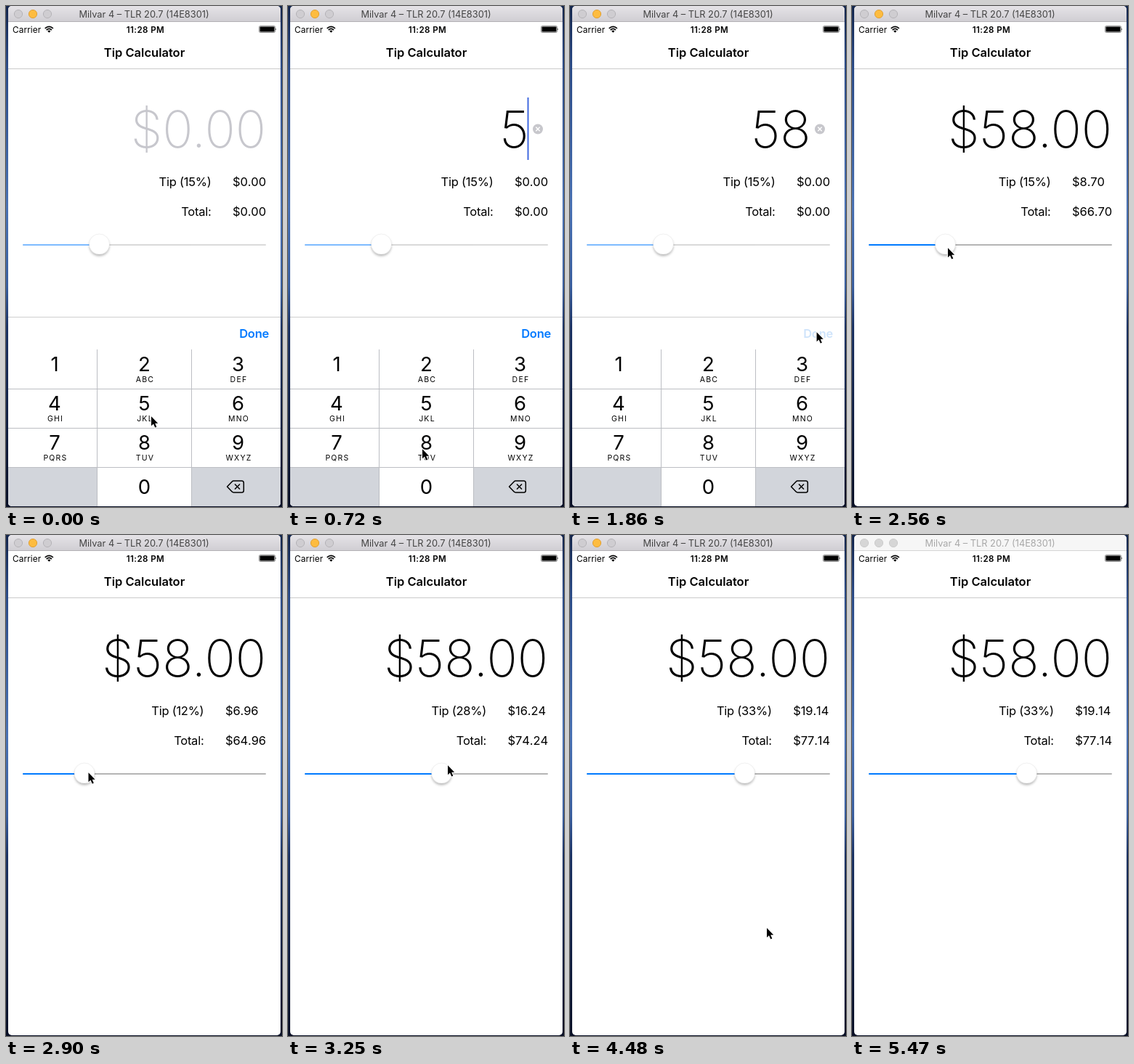
Recreate the animation shown at these times as an HTML page. Size 380 by 690 pixels, loop 5540 ms.

```html
<!DOCTYPE html>
<html lang="en">
<head>
<meta charset="utf-8">
<title>Tip Calculator</title>
<style>
html, body { margin: 0; width: 100%; height: 100%; overflow: hidden; background: #0a1026; }
svg { display: block; }
text { font: 16.5px Inter, "Liberation Sans", sans-serif; letter-spacing: -.25px; font-optical-sizing: none; }
.mid { text-anchor: middle; }
.end { text-anchor: end; }
.semi { font-weight: 600; }
.value { font-kerning: none; letter-spacing: -.1px; }
#amount { font-size: 70px; font-weight: 200; letter-spacing: 0; }
#heading { letter-spacing: 0; }
.digit { font-size: 27.5px; letter-spacing: 0; }
.letters { font-size: 10.5px; letter-spacing: 1.25px; }
</style>
</head>
<body>
<svg width="380" height="690" viewBox="0 0 380 690">
  <defs>
    <linearGradient id="desk" x2="0" y2="1">
      <stop stop-color="#14264c"/><stop offset=".12" stop-color="#2c4c88"/>
      <stop offset=".4" stop-color="#4a72b4"/><stop offset=".56" stop-color="#3a5f9f"/>
      <stop offset=".64" stop-color="#1c3364"/><stop offset="1" stop-color="#0a1026"/>
    </linearGradient>
    <linearGradient id="bar" x2="0" y2="1">
      <stop stop-color="#e5e3e7"/><stop offset="1" stop-color="#d0ced3"/>
    </linearGradient>
    <clipPath id="frame"><rect x="3" width="375" height="689" rx="5"/></clipPath>
    <filter id="shadow" x="-50%" y="-50%" width="200%" height="200%">
      <feDropShadow dx="0" dy="2.5" stdDeviation="1.8" flood-opacity=".25"/>
    </filter>
  </defs>
  <rect width="380" height="690" fill="url(#desk)"/>
  <g clip-path="url(#frame)">
    <rect width="380" height="690" fill="#fff"/>
    <rect id="titleBar" width="380" height="21"/>
    <path id="barLine" d="M3 21.5H378"/>
    <g id="lights"></g>
    <text id="device" class="mid" x="190" y="16" style="font-size:12.8px;letter-spacing:0">Milvar 4 – TLR 20.7 (14E8301)</text>

    <text x="9" y="36.5" style="font-size:11.8px;letter-spacing:.1px">Carrier</text>
    <g fill="none" stroke="#000" stroke-width="1.7">
      <path d="M53.7 30.8Q59.3 25.9 64.9 30.8M55.7 33Q59.3 29.9 62.9 33"/>
    </g>
    <path d="M57.2 34.4Q59.3 32.8 61.4 34.4L59.3 36.7Z"/>
    <text class="mid semi" x="192" y="36.5" style="font-size:11.6px;letter-spacing:.4px">11:28 PM</text>
    <rect x="348.5" y="27.5" width="22" height="9" rx="1.8" fill="none" stroke="#000" stroke-opacity=".45"/>
    <rect x="349.5" y="28.5" width="20" height="7" rx=".8"/>
    <path d="M371.4 30.4q1.5 1.6 0 3.2z"/>

    <text id="heading" class="mid semi" x="190.5" y="70">Tip Calculator</text>
    <path d="M3 86.5H378" stroke="#cacaca"/>

    <text id="amount" class="end" y="195"></text>
    <rect id="caret" y="126" width="2" height="86" fill="#426be0"/>
    <g id="clear">
      <circle cx="344" cy="169.5" r="7" fill="#c7c7cc"/>
      <path d="M341.3 166.8l5.4 5.4m0-5.4l-5.4 5.4" stroke="#fff" stroke-width="1.4"/>
    </g>
    <text id="tipLabel" class="end" y="248"></text>
    <text id="tip" class="value" y="248"></text>
    <text id="totalLabel" class="end" y="288.5">Total:</text>
    <text id="total" class="value" y="288.5"></text>

    <g id="track">
      <rect x="23" y="328" width="335" height="2" rx="1" fill="#b5b5b5"/>
      <rect id="fill" x="23" y="328" height="2" rx="1" fill="#007aff"/>
    </g>
    <circle id="thumb" cy="328" r="14" fill="#fff" stroke="#000" stroke-opacity=".1" stroke-width=".6" filter="url(#shadow)"/>

    <g id="keyboard">
      <rect x="3" y="429" width="375" height="261" fill="#fff"/>
      <path d="M3 428.5H378" stroke="#cfcfcf"/>
      <text id="done" class="end semi" x="362" y="457">Done</text>
      <path d="M3 635H125V690H3zM256 635H378V690H256z" fill="#d2d5db"/>
      <rect id="press" x="126" width="129" height="54" fill="#d2d5db"/>
      <path d="M3 527.5H378M3 581.5H378M3 635.5H378M125.5 473V690M255.5 473V690" stroke="#bcbec3"/>
      <g id="keys"></g>
      <path d="M304.5 662L311 655.2Q312 654 313.6 654H324.5Q327.3 654 327.3 656.8V667.2Q327.3 670 324.5 670H313.6Q312 670 311 668.8Z" fill="none" stroke="#000" stroke-width="1.5" stroke-linejoin="round"/>
      <path d="M315 658.5l7 7m0-7l-7 7" stroke="#000" stroke-width="1.5"/>
    </g>
    <path id="cursor" d="M1 1.2V14.2L4 11.5L6.2 16.6L8.3 15.7L6.2 10.7H10.2Z" stroke="#fff" stroke-width="1.8" paint-order="stroke"/>
  </g>
</svg>
<script>
const LOOP = 5540, STEP = 87.8, BILL = 58;
const $ = id => document.getElementById(id);
const set = (id, attrs) => { for (const k in attrs) $(id).setAttribute(k, attrs[k]); };
const show = (id, on) => set(id, { visibility: on ? "visible" : "hidden" });
const money = v => "$" + v.toFixed(2);

// Linear interpolation through [step, ...values] points.
function along(points, n) {
  const i = points.findIndex(p => p[0] > n);
  if (i < 0) return points[points.length - 1].slice(1);
  if (i === 0) return points[0].slice(1);
  const a = points[i - 1], b = points[i], k = (n - a[0]) / (b[0] - a[0]);
  return a.slice(1).map((v, j) => v + (b[j + 1] - v) * k);
}

const cursorPath = [
  [0, 199, 564], [2, 199, 565], [6, 197, 568], [7, 190, 590], [8, 184, 609],
  [12, 184, 609], [13, 205, 585], [14, 250, 520], [15, 290, 470], [16, 315, 447],
  [17, 330, 447], [18, 338, 448], [23, 339, 448], [25, 270, 410], [27, 165, 345],
  [29, 131, 332], [30, 118, 331], [32, 90, 328], [34, 135, 324], [37, 219, 316],
  [39, 246, 321], [40, 243, 326], [43, 145, 343], [44, 151, 343], [48, 247, 341],
  [49, 247, 341], [50, 253, 385], [51, 270, 540], [52, 284, 653], [53, 284, 653], [54, 299, 662]
];
const thumbPath = [
  [29, 128.5], [30, 114], [32, 86], [34, 130], [37, 211.5], [39, 239], [40, 237],
  [43, 148.5], [44, 154], [48, 240.5]
];

const keyNames = ["", "ABC", "DEF", "GHI", "JKL", "MNO", "PQRS", "TUV", "WXYZ"];
const columns = [67, 190.5, 319.5];
$("keys").innerHTML = keyNames.map((name, i) => {
  const x = columns[i % 3], y = 503 + 54 * Math.floor(i / 3);
  return `<text class="mid digit" x="${x}" y="${y}">${i + 1}</text>
    <text class="mid letters" x="${x + 1}" y="${y + 15}">${name}</text>`;
}).join("") + '<text class="mid digit" x="190.5" y="672">0</text>';

$("lights").innerHTML = [17, 37, 57].map(x => `<circle cx="${x}" cy="11" r="5.6"/>`).join("");

function drawTitleBar(active) {
  set("titleBar", { fill: active ? "url(#bar)" : "#f6f6f6" });
  set("barLine", { stroke: active ? "#b3b1b5" : "#d5d5d5" });
  set("device", { fill: active ? "#444" : "#a8a8a8" });
  [...$("lights").children].forEach((c, i) => {
    const lit = active && i === 1;
    c.setAttribute("fill", lit ? "#fdbc40" : active ? "#cfcdd1" : "#d6d6d6");
    c.setAttribute("stroke", lit ? "#dfa036" : active ? "#b5b3b7" : "#cbcbcb");
  });
}

function drawAmount(n) {
  const typing = n >= 6 && n < 23;
  $("amount").textContent = n < 6 ? "$0.00" : n < 11 ? "5" : n < 23 ? "58" : money(BILL);
  set("amount", { x: typing ? 331.5 : 358, fill: n < 6 ? "#c7c7cd" : "#000" });
  set("caret", { x: typing ? 329.5 : 355.5 });
  show("caret", n >= 2 && n < 18);
  show("clear", typing);
}

function drawTip(n) {
  const [x] = along(thumbPath, n), entered = n >= 23;
  const percent = Math.round((x - 37) / 6.14), bill = entered ? BILL : 0;
  const tip = bill * percent / 100;
  $("tipLabel").textContent = `Tip (${percent}%)`;
  $("tip").textContent = money(tip);
  $("total").textContent = money(bill + tip);
  const left = 358 - Math.max($("tip").getComputedTextLength(), $("total").getComputedTextLength());
  for (const id of ["tip", "total"]) {
    set(id, { x: left });
    set(id + "Label", { x: left - 29.5 });
  }
  set("track", { opacity: entered ? 1 : .5 });
  set("fill", { width: x - 23 });
  set("thumb", { cx: x });
}

function drawKeyboard(n) {
  const k = Math.min(1, Math.max(0, (n - 22.5) / 4.5));
  set("keyboard", { transform: `translate(0 ${265 * (1 - (1 - k) ** 3)})` });
  set("done", { fill: n >= 21 ? "#cfe4fb" : "#007aff" });
  set("press", { y: n < 8 ? 527 : 581 });
  show("press", n === 5 || n === 10 || n === 11);
}

function draw(now) {
  const t = now % LOOP, n = Math.floor(t / STEP + .001);
  drawTitleBar(t < 5470);
  drawAmount(n);
  drawTip(n);
  drawKeyboard(n);
  set("cursor", { transform: `translate(${along(cursorPath, n)})` });
  show("cursor", n < 55);
}

const start = performance.now();
function tick() {
  draw(performance.now() - start);
  requestAnimationFrame(tick);
}
tick();
</script>
</body>
</html>
```
